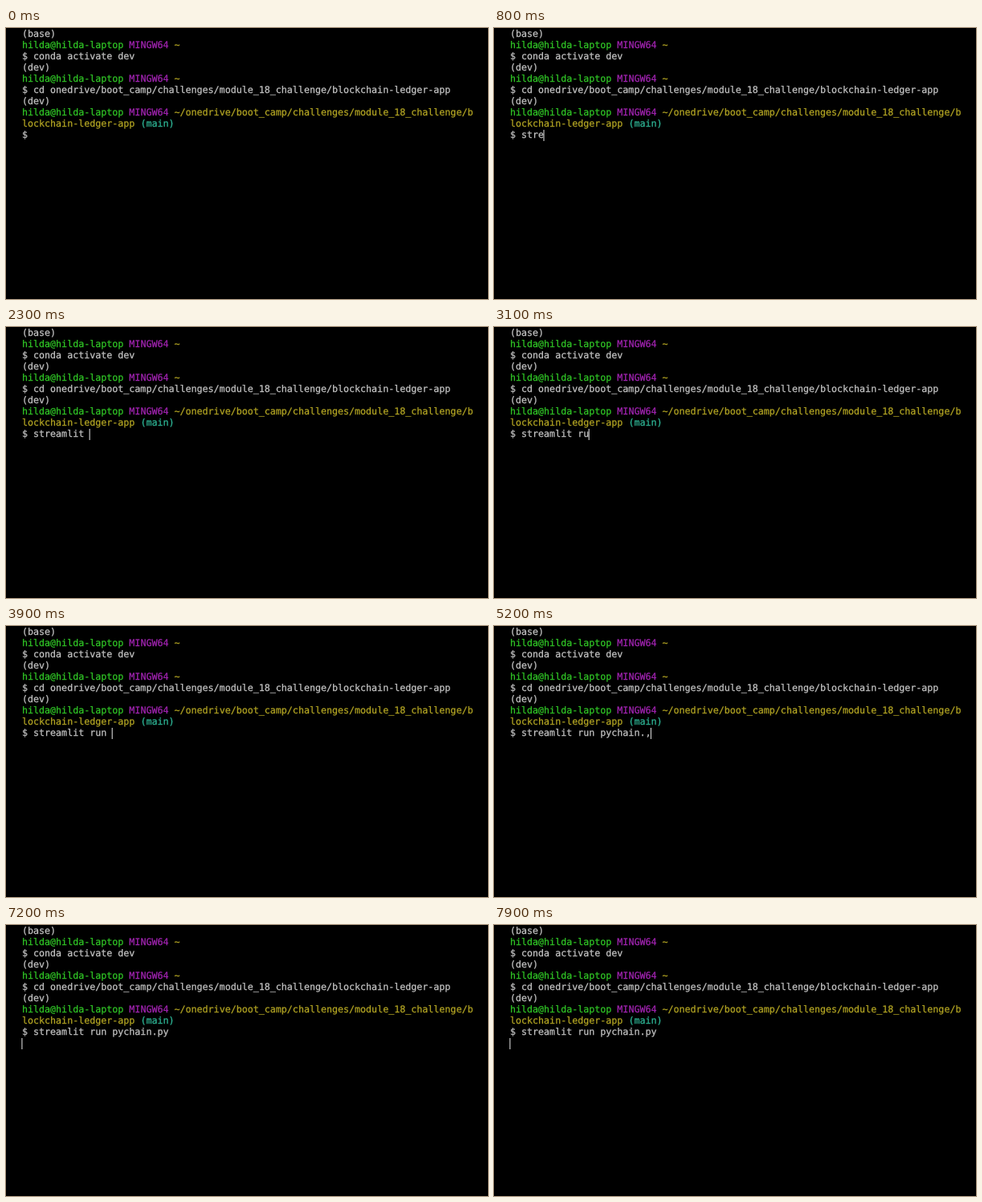
Write an HTML page that moves like this. It is 600 by 338 pixels and loops after 8000 ms.

```html
<!DOCTYPE html>
<html lang="en">
<head>
<meta charset="utf-8">
<title>Terminal</title>
<style>
  html, body { margin: 0; width: 100%; height: 100%; overflow: hidden; background: #000; }
  svg { display: block; width: 100vw; height: 100vh; }
  text {
    font: 11.66px "DejaVu Sans Mono", "Liberation Mono", monospace;
    white-space: pre;
    text-rendering: geometricPrecision;
    stroke-width: 0.25;
  }
  .plain { fill: #c4c4c4; stroke: #c4c4c4; }
  .user { fill: #30c626; stroke: #30c626; }
  .host { fill: #a424b4; stroke: #a424b4; }
  .path { fill: #b3a523; stroke: #b3a523; }
  .branch { fill: #2fb898; stroke: #2fb898; }
</style>
</head>
<body>
<svg id="stage" viewBox="0 0 600 338" xmlns="http://www.w3.org/2000/svg"></svg>
<script>
const LOOP = 8000, BLINK = 600;
const LEFT = 20, TOP = 1, CELL = 7.02, LINE = 14;
const PROMPT_ROW = 9, PROMPT = '$ ';

const stage = document.getElementById('stage');

function add(tag, attrs, parent = stage) {
  const el = document.createElementNS('http://www.w3.org/2000/svg', tag);
  for (const key in attrs) el.setAttribute(key, attrs[key]);
  return parent.appendChild(el);
}

function addRow(row, spans) {
  const line = add('text', { class: 'plain', x: LEFT, y: TOP + row * LINE + 10 });
  for (const [text, style = 'plain'] of spans) {
    add('tspan', { class: style }, line).textContent = text;
  }
  return line;
}

const prompt = path => [['hilda@hilda-laptop ', 'user'], ['MINGW64 ', 'host'], [path, 'path']];

[
  [['(base)']],
  prompt('~'),
  [['$ conda activate dev']],
  [['(dev)']],
  prompt('~'),
  [['$ cd onedrive/boot_camp/challenges/module_18_challenge/blockchain-ledger-app']],
  [['(dev)']],
  prompt('~/onedrive/boot_camp/challenges/module_18_challenge/b'),
  [['lockchain-ledger-app ', 'path'], ['(main)', 'branch']],
].forEach((spans, row) => addRow(row, spans));

const command = addRow(PROMPT_ROW, [[PROMPT]]);
const cursor = add('rect', { width: 1.2, height: LINE, fill: '#c4c4c4' });

// Bursts of typing: start time, delay between keys, keys
const keys = [
  [300, 150, 'stre'],
  [950, 175, 'amlit'],
  [2000, 0, ' '],
  [2750, 220, 'run'],
  [3500, 0, ' '],
  [4050, 135, 'pychain.,'],
  [5700, 0, '\b'],
  [6200, 180, 'py'],
  [6680, 0, '\n'],
].flatMap(([start, step, text]) => [...text].map((key, i) => ({ at: start + i * step, key })));

function render(time) {
  let typed = '', entered = false, lastKey = -BLINK;
  for (const { at, key } of keys) {
    if (at > time) break;
    lastKey = at;
    if (key === '\b') typed = typed.slice(0, -1);
    else if (key === '\n') entered = true;
    else typed += key;
  }
  const line = PROMPT + typed;
  command.textContent = line;

  const column = entered ? 0 : line.length;
  const row = PROMPT_ROW + (entered ? 1 : 0);
  cursor.setAttribute('x', LEFT + column * CELL - 0.7);
  cursor.setAttribute('y', TOP + row * LINE);
  const lit = Math.floor((time - lastKey) / BLINK) % 2 === 0;
  cursor.setAttribute('visibility', lit ? 'visible' : 'hidden');
}

function tick() {
  render(performance.now() % LOOP);
  requestAnimationFrame(tick);
}
tick();
</script>
</body>
</html>
```
